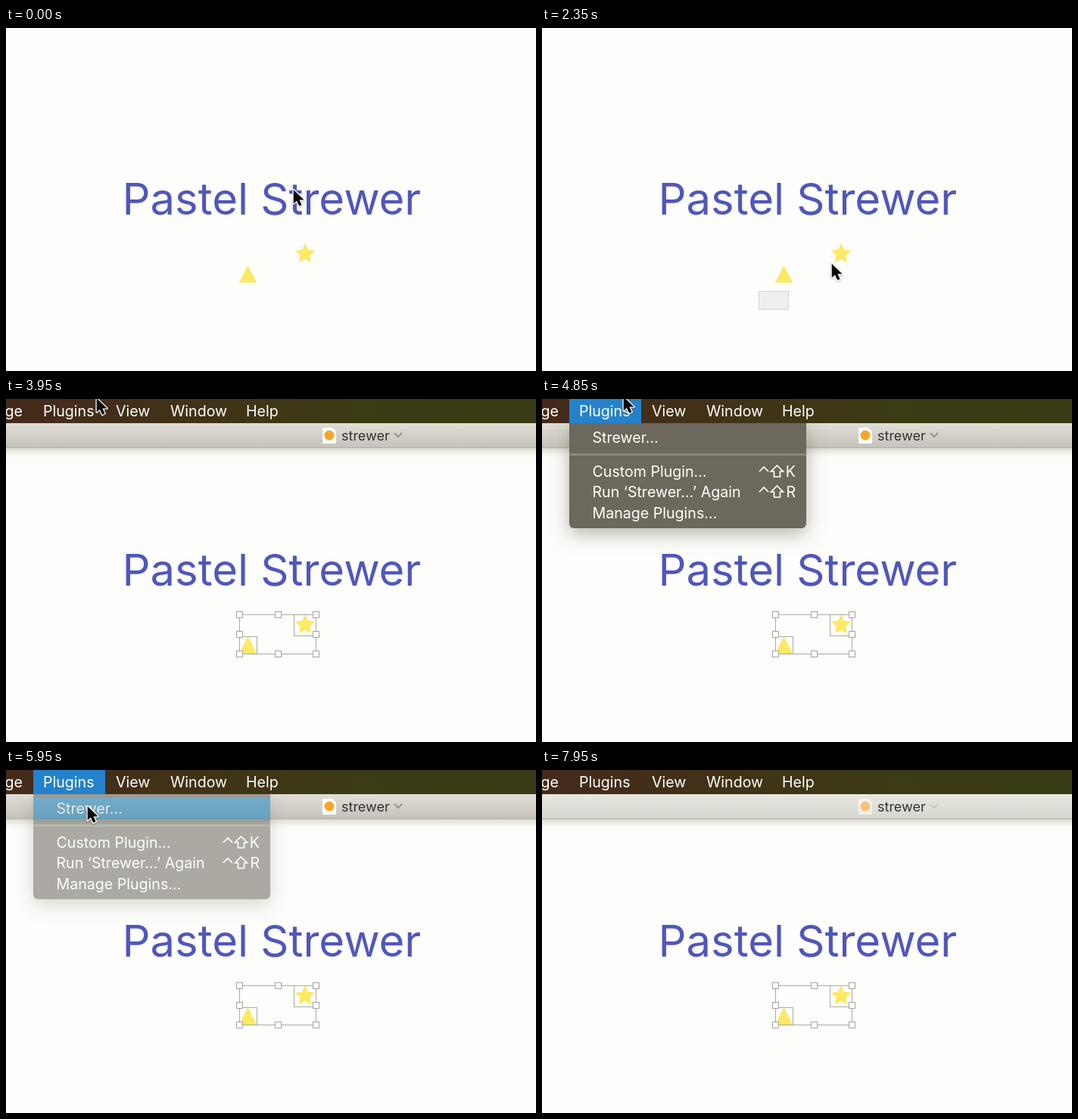
These frames come from a looping animation (700x454 px, 8000 ms). An HTML page with a canvas:

```html
<!DOCTYPE html>
<html lang="en">
<head>
<meta charset="utf-8">
<title>Plugin demo</title>
<style>
  html, body { margin: 0; width: 100%; height: 100%; overflow: hidden; background: #fdfdfc; }
  canvas { display: block; width: 700px; height: 454px; }
</style>
</head>
<body>
<canvas id="stage" width="700" height="454"></canvas>
<script>
const stage = document.getElementById('stage').getContext('2d');
const layer = Object.assign(document.createElement('canvas'), { width: 700, height: 454 }).getContext('2d');
let ctx = stage;

const LOOP = 8000;
const UI = 'Inter, Roboto, sans-serif';
const PAPER = '#fdfdfc';
const YELLOW = '#fce964';
const LINE = '#a9a9a2';
const LIGHT = '#fffffb';

// Pointer keyframes: time, x, y
const POINTER = [
  [0, 379, 213], [1300, 304, 424], [1720, 286, 373], [2080, 286, 373],
  [2350, 382, 311], [2600, 422, 274], [2850, 422, 274], [3400, 160, 33],
  [3550, 128, -2], [3750, 119, -2], [4050, 119, -2], [4300, 107, -4],
  [5100, 107, -4], [5450, 107, 47], [8000, 107, 47]
];

const clamp = v => Math.max(0, Math.min(1, v));
const ramp = (t, from, to) => clamp((t - from) / (to - from));
const ease = p => p * p * (3 - 2 * p);
const mix = (a, b, p) => a + (b - a) * p;

function pointerAt(t) {
  const i = Math.max(1, POINTER.findIndex(k => k[0] > t));
  const [t0, x0, y0] = POINTER[i - 1];
  const [t1, x1, y1] = POINTER[i];
  const p = ease(ramp(t, t0, t1));
  return { x: mix(x0, x1, p), y: mix(y0, y1, p) };
}

function text(str, x, y, size, color, align = 'left') {
  ctx.font = `400 ${size}px ${UI}`;
  ctx.textAlign = align;
  ctx.fillStyle = color;
  ctx.fillText(str, x, y);
}

function path(points, close = true) {
  ctx.beginPath();
  points.forEach(([x, y]) => ctx.lineTo(x, y));
  if (close) ctx.closePath();
}

function box(x, y, w, h, fill) {
  ctx.fillStyle = fill;
  ctx.fillRect(x, y, w, h);
}

function outline(x, y, w, h, color) {
  ctx.strokeStyle = color;
  ctx.lineWidth = 1;
  ctx.strokeRect(x + 0.5, y + 0.5, w, h);
}

function gradient([x0, x1], [y0, y1], ...colors) {
  const g = ctx.createLinearGradient(x0, y0, x1, y1);
  colors.forEach((c, i) => g.addColorStop(i / (colors.length - 1), c));
  return g;
}

function drawArtwork() {
  text('Pastel Strewer', 153.5, 246.5, 58, '#5057bb');
  ctx.fillStyle = YELLOW;
  path([[319.5, 314], [331, 337], [308, 337]]);
  ctx.fill();
  const star = Array.from({ length: 10 }, (_, i) => {
    const a = i * Math.PI / 5 - Math.PI / 2;
    const r = i % 2 ? 6.7 : 14;
    return [395 + r * Math.cos(a), 299 + r * Math.sin(a)];
  });
  path(star);
  ctx.fill();
}

function drawMarquee(t) {
  if (t < 2120 || t >= 2800) return;
  const tip = pointerAt(t - 153);
  const w = Math.round(tip.x - 286), h = Math.round(373 - tip.y);
  if (w < 2) return;
  box(286, 373 - h, w, h, 'rgba(170, 170, 175, 0.18)');
  outline(286, 373 - h, w, h - 1, '#d2d2cf');
}

function drawSelection(t) {
  if (t < 2500) return;
  const both = t >= 2600;
  const x1 = both ? 409 : 331, y0 = both ? 285 : 314;
  outline(308, 314, 23, 23, LINE);
  if (both) {
    outline(380, 285, 29, 28, LINE);
    outline(308, 285, 101, 52, LINE);
  }
  for (const i of [0, 1, 2]) {
    for (const j of [0, 1, 2]) {
      if (i === 1 && j === 1) continue;
      const x = Math.round(mix(308, x1, i / 2)) - 4;
      const y = Math.round(mix(y0, 337, j / 2)) - 4;
      box(x, y, 9, 9, '#fffffe');
      outline(x, y, 8, 8, '#a3a39e');
    }
  }
}

function drawBars(t) {
  const shown = ease(ramp(t, 3450, 3750));
  if (!shown) return;
  ctx.save();
  ctx.translate(0, Math.round(-82 * (1 - shown)));

  box(0, 65, 700, 17, gradient([0, 0], [65, 82], 'rgba(180,180,165,.5)', 'rgba(225,225,210,.25)', 'rgba(253,253,252,0)'));
  const idle = ramp(t, 6900, 7300);
  box(0, 32, 700, 33, gradient([0, 0], [32, 65], '#e0ded6', '#c4c2ba'));
  box(0, 32, 700, 33, `rgba(246,245,240,${0.35 * idle})`);
  box(0, 64, 700, 1, '#b0aea6');

  // Document icon, name and chevron
  ctx.globalAlpha = mix(1, 0.6, idle);
  ctx.fillStyle = '#fffefb';
  path([[418, 38], [431, 38], [436, 43], [436, 59], [418, 59]]);
  ctx.fill();
  ctx.fillStyle = '#f7a52c';
  ctx.beginPath();
  ctx.arc(427, 48, 6.5, 0, Math.PI * 2);
  ctx.fill();
  ctx.globalAlpha = 1;
  text('strewer', 443, 55, 18, '#34332e');
  ctx.globalAlpha = mix(1, 0.3, idle);
  ctx.strokeStyle = '#96948c';
  ctx.lineWidth = 2;
  path([[513, 45], [518, 50], [523, 45]], false);
  ctx.stroke();
  ctx.globalAlpha = 1;

  box(0, 0, 700, 32, gradient([0, 700], [0, 0], '#452a1c', '#413117', '#3b3b14', '#383b13'));
  if (t >= 4400 && t < 6150) box(36, 0, 95, 32, '#2482cc');
  text('ge', 22, 23, 19.6, LIGHT, 'right');
  [['Plugins', 49], ['View', 145], ['Window', 217], ['Help', 317]]
    .forEach(([label, x]) => text(label, x, 23, 19.6, LIGHT));
  ctx.restore();
}

function drawShortcut(key, y) {
  ctx.strokeStyle = LIGHT;
  ctx.lineWidth = 1.7;
  path([[287, y - 7], [293, y - 13], [299, y - 7]], false);
  ctx.stroke();
  path([[310.5, y - 15], [318.5, y - 7], [314.5, y - 7], [314.5, y], [306.5, y], [306.5, y - 7], [302.5, y - 7]]);
  ctx.stroke();
  text(key, 335, y, 19.6, LIGHT, 'right');
}

function drawMenuPanel(t) {
  ctx.save();
  ctx.beginPath();
  ctx.rect(0, 32, 700, 422);
  ctx.clip();
  ctx.shadowColor = 'rgba(110, 110, 85, 0.5)';
  ctx.shadowBlur = 24;
  ctx.shadowOffsetY = 7;
  ctx.fillStyle = '#6d685d';
  ctx.beginPath();
  ctx.roundRect(36, 32, 313, 139, [0, 0, 6, 6]);
  ctx.fill();
  ctx.shadowColor = 'transparent';

  const blink = t >= 5750 && t < 5820;
  if (pointerAt(t).y >= 37 && !blink) box(36, 37, 313, 28, '#1f88c4');
  box(36, 72, 313, 3, '#8a8674');
  [['Strewer…', 58], ['Custom Plugin…', 103], ['Run ‘Strewer…’ Again', 130], ['Manage Plugins…', 158]]
    .forEach(([label, y]) => text(label, 66.5, y, 19.6, LIGHT));
  drawShortcut('K', 103);
  drawShortcut('R', 130);
  ctx.restore();
}

// The menu is composed on its own layer so that it fades as one piece.
function drawMenu(t) {
  const alpha = t < 4400 ? 0 : 1 - ramp(t, 5840, 6090);
  if (!alpha) return;
  layer.clearRect(0, 0, 700, 454);
  ctx = layer;
  drawMenuPanel(t);
  ctx = stage;
  ctx.globalAlpha = alpha;
  ctx.drawImage(layer.canvas, 0, 0);
  ctx.globalAlpha = 1;
}

function drawPointer(t) {
  if ((t >= 450 && t < 1300) || t >= 6900) return;
  const { x, y } = pointerAt(t);
  ctx.save();
  ctx.translate(x + 0.7, y + 1);
  ctx.scale(0.84, 0.84);
  path([[0, 0], [0, 22], [5, 17.5], [9, 26], [13, 24], [9.2, 16], [16.5, 16]]);
  ctx.lineJoin = 'round';
  ctx.lineWidth = 3;
  ctx.strokeStyle = '#fffffd';
  ctx.shadowColor = 'rgba(80, 80, 70, 0.4)';
  ctx.shadowBlur = 3;
  ctx.shadowOffsetY = 1;
  ctx.stroke();
  ctx.shadowColor = 'transparent';
  ctx.fillStyle = '#080808';
  ctx.fill();
  ctx.restore();
}

function draw(t) {
  box(0, 0, 700, 454, PAPER);
  drawArtwork();
  drawMarquee(t);
  drawSelection(t);
  drawBars(t);
  drawMenu(t);
  drawPointer(t);
}

const start = performance.now();
function tick() {
  draw((performance.now() - start) % LOOP);
  requestAnimationFrame(tick);
}
tick();
</script>
</body>
</html>
```
